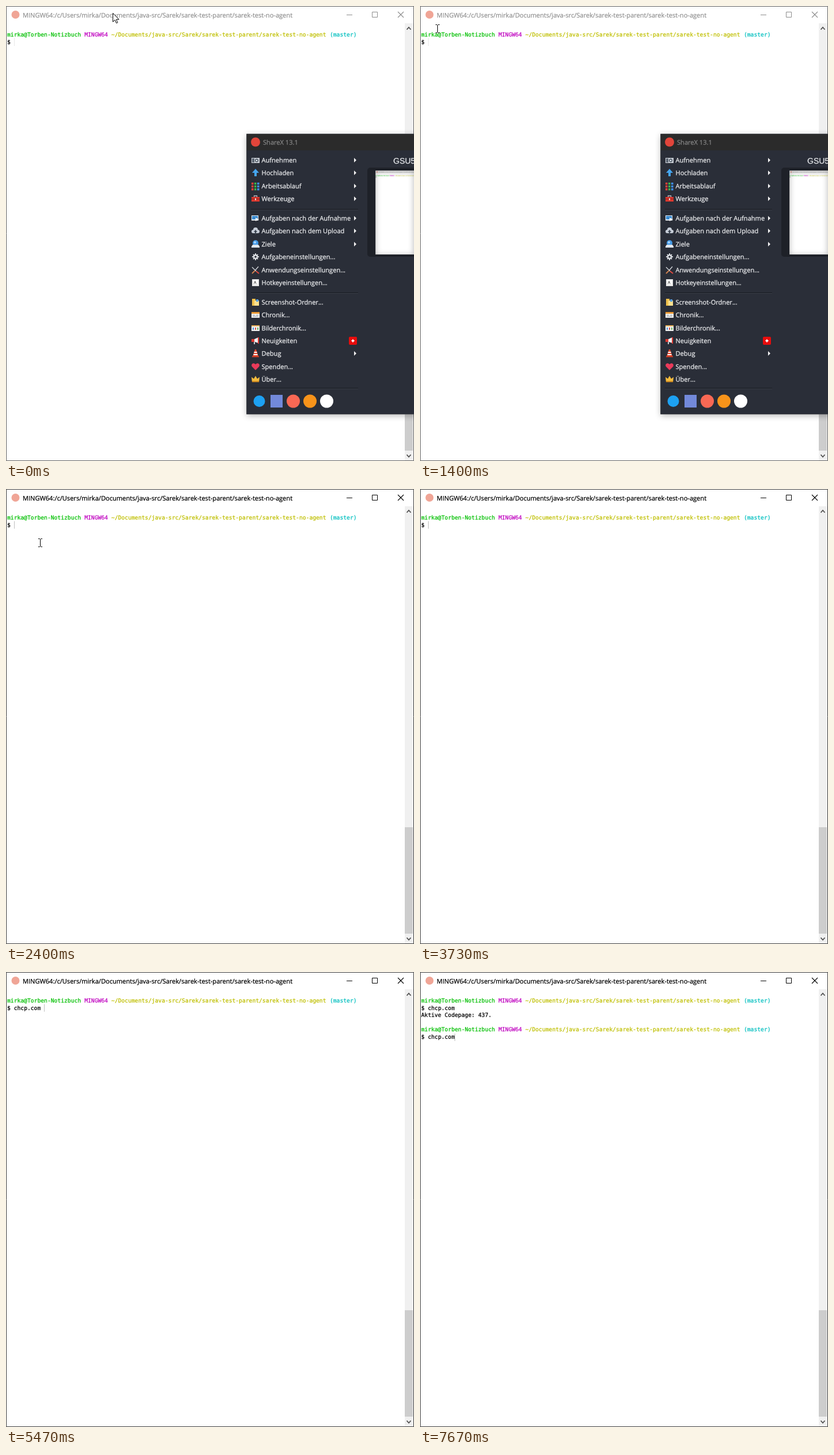
Animation of 708 by 791 pixels, one loop 8000 ms. Source, as an HTML page with a canvas:

```html
<!DOCTYPE html>
<html lang="de">
<head>
<meta charset="utf-8">
<style>
html, body { margin: 0; width: 100%; height: 100%; overflow: hidden; background: #fff; }
canvas { display: block; }
</style>
</head>
<body>
<canvas id="stage" width="708" height="791"></canvas>
<script>
const LOOP = 8000;
const stage = document.getElementById('stage');
const ctx = stage.getContext('2d');
const UI = '"Open Sans", sans-serif', MONO = '"DejaVu Sans Mono", monospace';
const COL = 5.833, LINE = 12.6;
const DIR = 'Documents/java-src/Sarek/sarek-test-parent/sarek-test-no-agent';
const PROMPT = [['mirka@Torben-Notizbuch ', '#00bf00'], ['MINGW64 ', '#bf00bf'],
  [`~/${DIR} `, '#bfbf00'], ['(master)', '#00bfbf']];

// Held values: [start time, value...]
const COMMANDS = [[0, ''],
  [3800, 'mvn -Dfile.encoding=UTF-8 --projects sarek-test-no-agent test'],
  [4270, 'chcp.com 437'], [5130, 'chcp.com 43'], [5270, 'chcp.com 4'],
  [5470, 'chcp.com '], [5670, 'chcp.com']];
const POINTER = [[0, 185, 12], [670, 180, 45], [730, 166, 105], [800, 150, 160], [870, 138, 194],
  [930, 132, 204], [1130, 127, 190], [1200, 96, 128], [1270, 58, 72], [1330, 36, 45],
  [1400, 30, 39], [1470, 26, 35], [1530, 28, 36], [1670, 33, 50], [1730, 45, 78],
  [1870, 56, 98], [1930, 58, 101], [2130, 59, 98], [2200, 59, 95], [2270, 59, 93]];
const CURSOR_OFF = [[3000, 3530], [4800, 5070], [6670, 7200]];

const at = (steps, t) => steps.findLast(step => step[0] <= t);

function rect(color, x, y, w, h) {
  ctx.fillStyle = color;
  ctx.fillRect(x, y, w, h);
}
function roundRect(color, x, y, w, h, r) {
  ctx.fillStyle = color;
  ctx.beginPath();
  ctx.roundRect(x, y, w, h, r);
  ctx.fill();
}
function circle(color, x, y, r) {
  ctx.fillStyle = color;
  ctx.beginPath();
  ctx.arc(x, y, r, 0, 7);
  ctx.fill();
}
function shape(color, path) {
  ctx.fillStyle = color;
  ctx.fill(new Path2D(path));
}
function stroke(color, width, path) {
  ctx.strokeStyle = color;
  ctx.lineWidth = width;
  ctx.stroke(new Path2D(path));
}
// The thin outline gives the dense look of screen-hinted type
function text(str, x, y, color, size = 11.08, family = UI) {
  ctx.font = `${size}px ${family}`;
  ctx.fillStyle = ctx.strokeStyle = color;
  ctx.lineWidth = .25;
  ctx.fillText(str, x, y);
  ctx.strokeText(str, x, y);
}

function mono(str, col, row, color = '#000') {
  text(str, 2 + col * COL, Math.floor(53.5 + row * LINE), color, 9.69, MONO);
}
function prompt(row) {
  let col = 0;
  for (const [str, color] of PROMPT) {
    mono(str, col, row, color);
    col += str.length;
  }
  mono('$', 0, row + 1);
}

function windowFrame(active) {
  const ink = active ? '#000' : '#8c8c8c';
  rect('#fff', 0, 0, 708, 791);
  circle('#f0a596', 16.5, 15, 7);
  text(`MINGW64:/c/Users/mirka/${DIR}`, 29, 19.5, active ? '#000' : '#939393');
  stroke(ink, 1, 'M591 15.5h10M635.5 10.5h9v9h-9z');
  stroke(ink, 1.1, 'M680 10l10 10M690 10l-10 10');
  rect('#f0f0f0', 692, 30, 15, 760);
  rect('#cdcdcd', 692, 588, 14, 185);
  stroke('#505050', 1.8, 'M695.5 41l3.5-4 3.5 4M695.5 780l3.5 4 3.5-4');
  stroke(active ? '#3c3c3c' : '#626262', 1, 'M.5 .5h707v790H.5z');
}

function terminal(t) {
  windowFrame(t >= 2400);
  prompt(0);
  const command = at(COMMANDS, t)[1];
  mono(command, 2, 1);
  let col = 2 + command.length, row = 1;
  if (t >= 6070) {
    mono('Aktive Codepage: 437.', 0, 2);
    col = 0;
    row = 2;
  }
  if (t >= 6130) {
    const typed = t >= 7670 ? 'chcp.com' : '';
    prompt(4);
    mono(typed, 2, 5);
    col = 2 + typed.length;
    row = 5;
  }
  const x = Math.round(2 + col * COL), y = Math.round(43.6 + row * LINE);
  if (t < 2400) for (let i = 0; i < 13; i += 2) rect('#d0d0d0', x, y + i, 1, 1);
  else if (!CURSOR_OFF.some(([from, to]) => t >= from && t < to)) rect('#bfbfbf', x, y, 1, 13);
}

// Menu icons, drawn in a 14 x 14 box
const ICONS = {
  camera() {
    rect('#c9ced5', 0, 3, 14, 9);
    rect('#59636f', 1, 4, 4, 7);
    circle('#46505c', 9, 7.5, 3);
    circle('#dfe7f0', 9, 7.5, 1.5);
  },
  up() { shape('#45a5ef', 'M7 0l6 7H9v6H5V7H1z'); },
  grid() {
    ['#e8403a', '#39b54a', '#3f8ff0'].forEach((color, i) => {
      for (let j = 0; j < 3; j++) rect(color, 5 * i, 1 + 5 * j, 3.5, 3.5);
    });
  },
  toolbox() {
    stroke('#b8bcc4', 1.3, 'M4.5 4V2h5v2');
    rect('#d8372d', 0, 4, 14, 8);
    rect('#8c1d18', 0, 7, 14, 1);
    rect('#e6e6e6', 6, 6.5, 2, 3);
  },
  picture() {
    rect('#e4edf6', 0, 2, 12, 9);
    rect('#3b8bd0', 1, 3, 10, 6);
    shape('#fff', 'M7 6l6 3-6 3z');
  },
  cloud() {
    shape('#c7ced8', 'M3 11a3 3 0 010-6 4 4 0 018 0 3 3 0 010 6z');
    shape('#3a4350', 'M7 5l3 4H8v4H6V9H4z');
  },
  drive() {
    circle('#4499e5', 7, 5, 5);
    shape('#e1e8ef', 'M2 8h10l2 3v2H0v-2z');
    circle('#a9d6ff', 6, 4, 2);
  },
  gear() {
    stroke('#dcdfe3', 2, 'M7 1v12M1 7h12M3 3l8 8M11 3l-8 8');
    circle('#dcdfe3', 7, 7, 4);
    circle('#2a2e38', 7, 7, 1.8);
  },
  tools() {
    stroke('#d9dce0', 1.2, 'M1 2l7 7M12 1L6 8');
    stroke('#e0483e', 2, 'M8 9l5 4');
    stroke('#d08050', 2, 'M6 8l-5 5');
  },
  key() {
    rect('#e9e9e9', 1, 1, 12, 12);
    rect('#fff', 3, 2, 8, 8);
    text('A', 4, 9, '#555', 7);
  },
  folder() {
    shape('#f0c14d', 'M1 1h6v12H1z');
    shape('#fbe08f', 'M5 4h8v9H5z');
    rect('#5aa0e0', 8, 2, 4, 4);
  },
  history() {
    rect('#f3f3f3', 0, 2, 14, 10);
    rect('#ed9b36', 0, 2, 14, 3);
    stroke('#9aa3ad', 1, 'M2 7.5h4M8 7.5h4M2 9.5h10');
  },
  gallery() {
    rect('#f3f3f3', 0, 2, 14, 10);
    rect('#e8b05a', 0, 2, 14, 2);
    ['#4b93dd', '#d9574d', '#69b35d'].forEach((color, i) => rect(color, 2 + 4 * i, 6, 2, 4));
  },
  horn() {
    shape('#eef0f2', 'M3 5l9-4v10L3 8z');
    shape('#dc3a32', 'M0 4h5v5H0zM11 1h2v11h-2z');
    rect('#c4c8cd', 4, 9, 2, 4);
  },
  cone() {
    shape('#e2492f', 'M6 0h2l4 12H2z');
    rect('#fff', 4.5, 4, 5, 2);
    rect('#fff', 3.5, 8, 7, 2);
    rect('#d23c25', 1, 11.5, 12, 2);
  },
  heart() { shape('#ea3a5a', 'M7 13L1 7C-2 2 4-1 7 3c3-4 9-1 6 4z'); },
  crown() {
    shape('#f3bb3d', 'M0 3l4 3 3-5 3 5 4-3-1 9H1z');
    rect('#c88520', 1, 10, 12, 2);
  }
};

// Label, icon, vertical centre, submenu flag
const MENU = [
  ['Aufnehmen', 'camera', 268, 1], ['Hochladen', 'up', 290, 1],
  ['Arbeitsablauf', 'grid', 313, 1], ['Werkzeuge', 'toolbox', 335, 1],
  ['Aufgaben nach der Aufnahme', 'picture', 369, 1], ['Aufgaben nach dem Upload', 'cloud', 391, 1],
  ['Ziele', 'drive', 414, 1], ['Aufgabeneinstellungen...', 'gear', 436],
  ['Anwendungseinstellungen...', 'tools', 459], ['Hotkeyeinstellungen...', 'key', 481],
  ['Screenshot-Ordner...', 'folder', 515], ['Chronik...', 'history', 537],
  ['Bilderchronik...', 'gallery', 560], ['Neuigkeiten', 'horn', 582],
  ['Debug', 'cone', 604, 1], ['Spenden...', 'heart', 627], ['Über...', 'crown', 649]];

// Shrinks the terminal already on the stage into the preview panel
function thumbnail() {
  ctx.imageSmoothingQuality = 'high';
  ctx.drawImage(stage, 0, 0, 708, 791, 641, 286, 131, 146);
}

function captureTool() {
  ctx.save();
  ctx.shadowColor = 'rgba(0,0,0,.3)';
  ctx.shadowBlur = 11;
  ctx.shadowOffsetY = 2;
  // Even-odd hole keeps the preview visible
  ctx.fillStyle = '#2a2e38';
  ctx.fill(new Path2D('M418 223h300v487H418zM641 286h67v146h-67z'), 'evenodd');
  ctx.restore();
  rect('#2b2b2b', 418, 223, 290, 28);
  stroke('#484a4f', 1, 'M708 222.5H417.5v487H708');
  circle('#e2453a', 433, 236.5, 8);
  text('ShareX 13.1', 446, 241, '#878787');

  for (const [label, icon, y, submenu] of MENU) {
    ctx.save();
    ctx.translate(426, y - 7);
    ICONS[icon]();
    ctx.restore();
    text(label, 443.5, y + 4, '#f0f1f3');
    if (submenu) shape('#f2f2f2', `M604 ${y - 4}l4 4-4 4z`);
  }
  for (const y of [353, 498, 664]) {
    rect('#16191f', 425, y, 186, 1);
    rect('#3a3f49', 425, y + 1, 186, 1);
  }
  roundRect('#e80c0c', 595, 575, 14, 14, 2);
  stroke('#fff', 2, 'M599.5 582h5M602 579.5v5');

  circle('#1da1f2', 439.5, 687, 10);
  rect('#7289da', 459, 676, 21, 22);
  circle('#f96854', 498.5, 687, 11.5);
  circle('#f7931a', 527.5, 687, 11.5);
  circle('#fff', 556.5, 687, 11.5);

  text('GSU5', 672, 273.5, '#e7e9ec', 14, '"Liberation Sans", sans-serif');
}

function pointer(t) {
  const [, x, y] = at(POINTER, t);
  ctx.save();
  ctx.translate(x, y);
  if (t < 670) {
    const arrow = 'M.5 .5v15l3.5-3.3 2.5 5.6 2.3-1-2.5-5.5h4.7z';
    shape('#fff', arrow);
    stroke('#000', 1, arrow);
  } else {
    stroke('#000', 1, 'M-3 -6.5h2.5l1 1 1-1H4M.5 -6V7M-3 7.5h2.5l1-1 1 1H4');
  }
  ctx.restore();
}

function draw() {
  const t = performance.now() % LOOP;
  ctx.textRendering = 'geometricPrecision';
  terminal(t);
  if (t < 2400) {
    captureToolWithPreview();
  }
  if (t < 3730) pointer(t);
  requestAnimationFrame(draw);
}

function captureToolWithPreview() {
  thumbnail();
  captureTool();
  ctx.fillStyle = '#1e2128';
  const panel = new Path2D('M641 286h67v146h-67z');
  panel.roundRect(627, 281, 90, 155, 5);
  ctx.fill(panel, 'evenodd');
}
draw();
</script>
</body>
</html>
```
